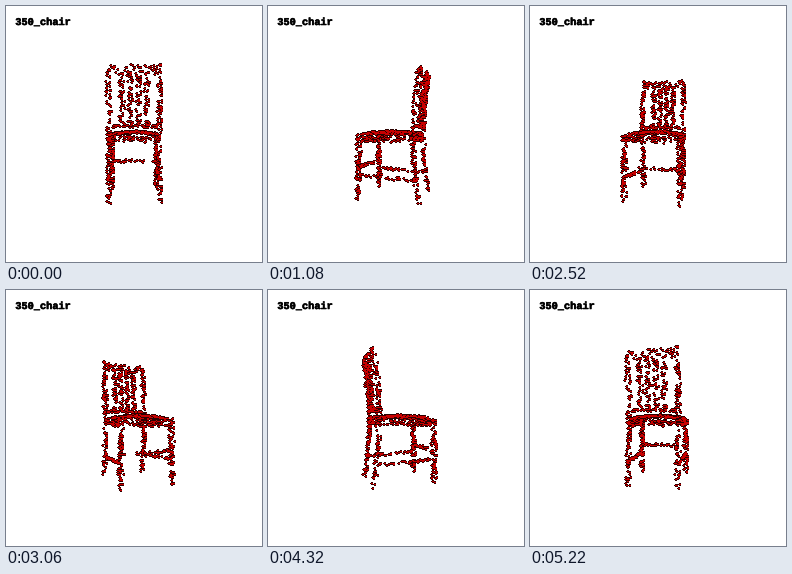
Write a matplotlib script that moves like this. It is 256x256 px and loops after 5.4 s.

```python
import numpy as np
import matplotlib.pyplot as plt
from matplotlib.animation import FuncAnimation
from matplotlib.patheffects import withStroke

SIZE, FRAMES, STEP_MS = 256, 30, 180
CAMERA = 220.0
CENTER_X, CENTER_Y = 127.4, 128
rng = np.random.default_rng(350)


def spread(n, lo, hi):
    return rng.uniform(lo, hi, n)


def bow(y):
    """Backward curve of the rear posts."""
    return 23 + 5.5 * (y / 61) ** 2


def beam(n, start, end, half):
    """Points in a straight bar; half is its half thickness per axis."""
    t = rng.random((n, 1))
    a, b = np.array(start, float), np.array(end, float)
    return a + (b - a) * t + rng.uniform(-1, 1, (n, 3)) * half


def rear_post(n, side):
    y = spread(n, -61, 61)
    return np.column_stack([side * 22.7 + spread(n, -2.2, 2.2), y,
                            bow(y) + spread(n, -2, 2)])


def back_part(n, x0, x1, y0, y1):
    """Patch of the backrest, curved backwards in the middle."""
    x, y = spread(n, x0, x1), spread(n, y0, y1)
    z = bow(y) + 3 * (1 - (x / 23) ** 2) + spread(n, -1, 1)
    return np.column_stack([x, y, z])


def seat(n):
    u, v = spread(n, -1, 1), spread(n, -1, 1)
    x = u * (24.8 - 1.3 * v)
    y = 3.2 - 3 * u ** 2 - 1.5 * v ** 2 + spread(n, -1, 0.6)
    return np.column_stack([x, y, -3 + 27 * v])


def build_chair():
    parts = [seat(290),
             back_part(45, -22, 22, 52, 60),
             back_part(40, -22, 22, 6, 9.5),
             beam(26, (-23, -30, -29), (23, -30, -29), (0, 1.2, 1)),
             beam(36, (-24, -4.5, -29), (24, -4.5, -29), (0, 3, 0.8)),
             beam(26, (-22, -4.5, 23), (22, -4.5, 23), (0, 3, 0.8))]
    parts += [back_part(42, x - 2.5, x + 2.5, 9, 54)
              for x in (-11, -3.7, 3.7, 11)]
    for s in (-1, 1):
        parts += [rear_post(110, s),
                  beam(78, (s * 25, 0, -29), (s * 25, -61, -29), (2.3, 0, 2.3)),
                  beam(40, (s * 25, -38, -28), (s * 23, -40, 25), (1, 1.4, 0)),
                  beam(30, (s * 25, -4.5, -28), (s * 23, -4.5, 22), (0.8, 3, 0))]
    return np.vstack(parts)


CHAIR = build_chair()

# One ball: a dark rim around a raised red core.
DX = np.array([0, 1, 0, 1, -1, 0, 1])
DY = np.array([-1, -1, 1, 1, 0, 0, 0])
CORE = np.array([0, 0, 0, 0, 0, 1, 1])
INK = np.where(CORE[:, None] == 1, (200, 0, 0), (45, 0, 0))
LIFT = 14 * CORE


def render(i):
    a = 2 * np.pi * i / FRAMES
    x, y, z = CHAIR.T
    depth = z * np.cos(a) - x * np.sin(a)
    scale = 1 / (1 - depth / CAMERA)
    px = np.rint(CENTER_X + (x * np.cos(a) + z * np.sin(a)) * scale).astype(int)
    py = np.rint(CENTER_Y - y * scale).astype(int)

    # Far pixels first, so that near balls cover them.
    order = np.argsort((depth[:, None] + LIFT).ravel(), kind="stable")
    cols = (px[:, None] + DX).ravel()[order]
    rows = (py[:, None] + DY).ravel()[order]
    canvas = np.full((SIZE, SIZE, 3), 255, np.uint8)
    canvas[rows, cols] = np.tile(INK, (len(CHAIR), 1))[order]
    return canvas


fig = plt.figure(figsize=(2.56, 2.56), dpi=100, facecolor="white")
ax = fig.add_axes([0, 0, 1, 1])
ax.axis("off")
picture = ax.imshow(render(0), interpolation="nearest",
                    extent=(0, SIZE, SIZE, 0), aspect="auto")
ax.text(9.3, 19, "350_chair", family="Liberation Mono", weight="bold",
        size=7.4, color="black", va="baseline",
        path_effects=[withStroke(linewidth=0.4, foreground="black")])


def update(i):
    picture.set_data(render(i))
    return [picture]


anim = FuncAnimation(fig, update, frames=FRAMES, interval=STEP_MS,
                     repeat=True, repeat_delay=0)
plt.show()
```
